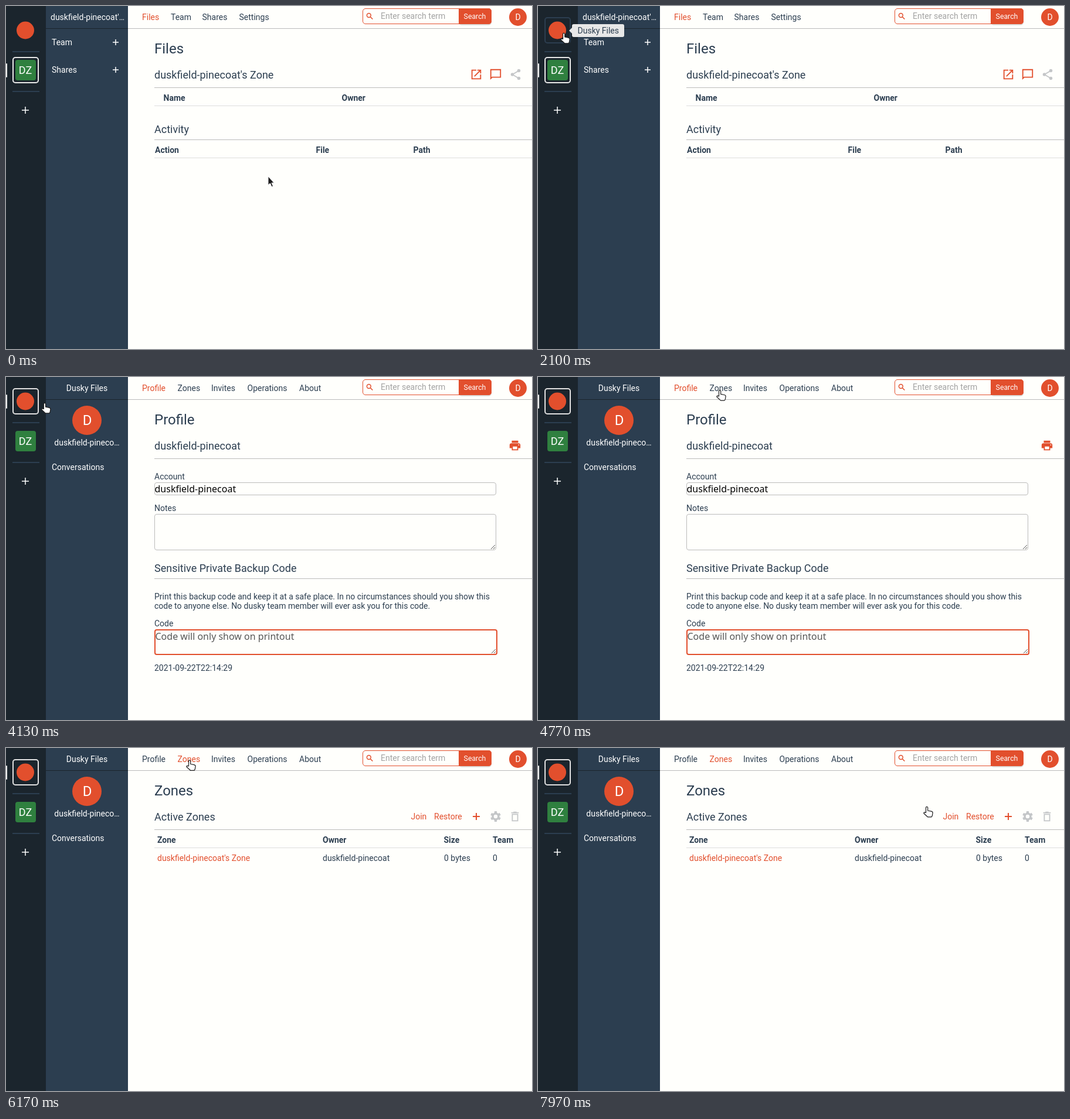
An HTML page for the animation above (8000 ms loop, 897 by 586 pixels).

```html
<!DOCTYPE html>
<html lang="en">
<head>
<meta charset="utf-8">
<title>Files and zones</title>
<style>
html, body { margin: 0; width: 100%; height: 100%; overflow: hidden; background: #fffffc; }
svg { display: block; }
text { font-family: Roboto, sans-serif; white-space: pre; }
</style>
</head>
<body>
<svg id="stage" width="897" height="586" viewBox="0 0 897 586"></svg>
<script>
const INK = '#2c3e50', RED = '#e24f2d', BAR = '#1b252d', PALE = '#fffffc';
const USER = 'duskfield-pinecoat', APP = 'Dusky Files';

const text = (x, y, s, { size = 14, fill = INK, attrs = '' } = {}) =>
  `<text x="${x}" y="${y}" font-size="${size}" fill="${fill}" ${attrs}>${s}</text>`;
const bold = (x, y, s) => text(x, y, s, { attrs: 'font-weight="700"' });
const mid = (x, y, s, size = 14) => text(x, y, s, { size, fill: '#fff', attrs: 'text-anchor="middle"' });
const rect = (x, y, w, h, fill, r = 0, attrs = '') =>
  `<rect x="${x}" y="${y}" width="${w}" height="${h}" rx="${r}" fill="${fill}" ${attrs}/>`;
const frame = (x, y, w, h, color, r = 3.5, line = 1) =>
  rect(x + line / 2, y + line / 2, w - line, h - line, 'none', r, `stroke="${color}" stroke-width="${line}"`);
const rule = (y, color = '#bbb', x = 253) => rect(x, y, 897 - x, 1, color);
const disc = (x, y, r, fill = RED) => `<circle cx="${x}" cy="${y}" r="${r}" fill="${fill}"/>`;
const plus = (x, y, r, color = '#fff', w = 1.5) =>
  `<path d="M${x - r} ${y}h${2 * r}M${x} ${y - r}v${2 * r}" stroke="${color}" stroke-width="${w}"/>`;
const group = (id, body) => `<g id="${id}">${body}</g>`;
const menu = items => items.map(([x, s, id], i) =>
  text(x, 24, s, { fill: i ? INK : RED, attrs: id ? `id="${id}"` : '' })).join('');
const grip = (x, y) => `<path d="M${x - 7} ${y}l7-7M${x - 3} ${y}l3-3" stroke="#555"/>`;

// 24-unit icon drawn at 22 px around a centre
const icon = (x, y, body, color = RED) =>
  `<g transform="translate(${x - 11} ${y - 11}) scale(.917)" fill="${color}" stroke="none">${body}</g>`;
const path = d => `<path d="${d}"/>`;
const stroke = (d, color, w) => `<path d="${d}" fill="none" stroke="${color}" stroke-width="${w}"/>`;
const GREY = '#c4c6c8';

const openIcon = icon(802, 117, stroke('M12 4H4V20H20V12M14 4H20V10M20 4L8.5 15.5', RED, 2));
const chatIcon = icon(835, 117, stroke('M3 19.5V3H21V17H5.5Z', RED, 2));
const shareIcon = icon(869, 117, stroke('M18 5L6 12L18 19', GREY, 2) +
  [[18, 5], [6, 12], [18, 19]].map(([x, y]) => disc(x, y, 3, GREY)).join(''), GREY);
const printIcon = icon(868, 117, path('M19 8H5c-1.7 0-3 1.3-3 3v6h4v4h12v-4h4v-6c0-1.7-1.3-3-3-3zm-3 11H8v-5h8v5zM18 3H6v4h12V3z') +
  disc(19, 11, 1, PALE));
const trashIcon = icon(868, 117, stroke('M7 8H17V20H7Z', GREY, 2) + path('M5 4h3.5l1-1h5l1 1H19v2H5z'), GREY);
const gearIcon = icon(835, 117, `<circle cx="12" cy="12" r="5.4" fill="none" stroke="${GREY}" stroke-width="3.8"/>` +
  [0, 60, 120].map(a => `<path d="M12 2.3v4M12 17.7v4" stroke="${GREY}" stroke-width="4.6" transform="rotate(${a} 12 12)"/>`).join(''));

const rail = rect(0, 0, 68, 586, BAR) + rect(68, 0, 140, 586, INK) + rect(68, 38, 140, 1, BAR) +
  rect(11, 77, 46, 2, INK) + rect(11, 145, 46, 2, INK) +
  disc(33, 41.5, 15) + rect(16, 92, 35, 35, '#2f803f', 4) + mid(33, 116, 'DZ', 18) + plus(33, 178, 6);

const topBar = rule(38, '#bbb', 208) +
  rect(772, 6, 56, 27, '#0002', 5) + rect(772, 4, 56, 27, RED, 5) + rect(772, 4, 6, 27, RED) +
  frame(608, 4, 220, 27, RED, 4.5) +
  `<g fill="none" stroke="${RED}" stroke-width="1.5"><circle cx="618.8" cy="16" r="3.4"/><path d="M621.3 18.5l4 4"/></g>` +
  text(639, 22, 'Enter search term', { fill: '#a3a3a3' }) + mid(799.5, 22, 'Search', 12.3) +
  disc(873, 19, 15) + mid(873, 24, 'D');

const files = rect(0, 98, 2, 24, '#eee', 1) + frame(11, 87, 45, 45, '#e8e8e8', 4, 2) +
  text(76, 24, USER + "'…", { fill: '#fff' }) +
  text(78, 67, 'Team', { fill: '#fff' }) + plus(187, 62, 5) +
  text(78, 114, 'Shares', { fill: '#fff' }) + plus(187, 109, 5) +
  menu([[232, 'Files'], [281, 'Team'], [334.5, 'Shares'], [397.5, 'Settings']]) +
  text(253, 81, 'Files', { size: 24 }) + text(253, 124, USER + "'s Zone", { size: 18 }) +
  openIcon + chatIcon + shareIcon + rule(139) + bold(268.5, 162, 'Name') + bold(572.5, 162, 'Owner') + rule(170, '#ddd') +
  text(253, 217, 'Activity', { size: 18 }) + rule(228) +
  bold(254, 251, 'Action') + bold(528.5, 251, 'File') + bold(694.5, 251, 'Path') + rule(259, '#ddd');

const hover = group('hover', frame(11, 19, 45, 45, INK, 4, 2)) +
  group('tip', rect(58, 31, 89, 22, '#e8e8e8', 3) + `<path d="M53 42l5-5v10z" fill="#e8e8e8"/>` +
    text(67.5, 47, APP));

const drive = rect(0, 30, 2, 24, '#eee', 1) + frame(11, 19, 45, 45, '#e0e0e0', 4, 2) +
  mid(138, 24, APP) + disc(138, 74, 25) + mid(138.5, 82, 'D', 24) +
  mid(138, 117, USER.slice(0, -2) + '…') + text(78, 159, 'Conversations', { fill: '#fff' }) +
  menu([[232, 'Profile', 'navProfile'], [292.5, 'Zones', 'navZones'], [350, 'Invites'], [411.5, 'Operations'], [500, 'About']]);

const field = (x, y, s, fill) => text(x, y, s, { size: 16, fill, attrs: `style="font-family:'Noto Sans',sans-serif"` });
const profile = text(253, 81, 'Profile', { size: 24 }) + text(253, 124, USER, { size: 18 }) + printIcon + rule(139) +
  text(253, 175, 'Account') + frame(253, 180, 583, 22, '#bbb') + field(253.5, 197, USER, '#000') +
  text(253, 229, 'Notes') + frame(253, 234, 583, 62, '#bbb') + grip(834, 294) +
  text(253, 333, 'Sensitive Private Backup Code', { size: 18 }) + rule(344) +
  text(253, 380, 'Print this backup code and keep it at a safe place. In no circumstances should you show this') +
  text(253, 396, 'code to anyone else. No dusky team member will ever ask you for this code.') +
  text(253, 426, 'Code') + frame(253, 431, 585, 44, RED, 3, 2) +
  field(254.5, 449, 'Code will only show on printout', '#555') + grip(835, 472) +
  text(253, 502, '2021-09-22T22:14:29');

const zones = text(253, 81, 'Zones', { size: 24 }) + text(253, 124, 'Active Zones', { size: 18 }) +
  text(690.5, 122, 'Join', { fill: RED }) + text(730, 122, 'Restore', { fill: RED }) +
  plus(802, 117, 6, RED, 2) + gearIcon + trashIcon + rule(139) +
  bold(258, 162, 'Zone') + bold(540, 162, 'Owner') + bold(746.5, 162, 'Size') + bold(830, 162, 'Team') + rule(170, '#ddd') +
  text(258, 193, USER + "'s Zone", { fill: RED }) + text(540, 193, USER) +
  text(747, 193, '0 bytes') + text(830, 193, '0');

const arrow = `<path id="arrow" d="M0 0V15l3.5-3 2.5 6 2.5-1-2.5-5.8h4.3z" fill="#1c1c1c" stroke="#fff"/>`;
const hand = `<path id="hand" d="M4.5 10.5V2a1.6 1.6 0 0 1 3.2 0V7l6 1.2q2.6.6 2.4 3l-.7 4q-.5 2.6-2 2.6H7.5L1 11.7q-.5-1.7 1.4-1.8z" fill="#fff" stroke="#1c1c1c" stroke-width="1.2" stroke-linejoin="round"/>`;

const stage = document.getElementById('stage');
stage.innerHTML = rail + topBar + group('files', files) + hover +
  group('drive', drive) + group('profile', profile) + group('zones', zones) + arrow + hand;

const el = id => document.getElementById(id);
const show = (id, on) => el(id).setAttribute('visibility', on ? 'visible' : 'hidden');
const ramp = (t, a, b) => Math.min(1, Math.max(0, (t - a) / (b - a)));

// start, end, x, y, ease-out power for x and y
const moves = [
  [800, 1570, 47, 31, 2, 1.43],
  [1600, 1760, 45, 53, 1, 1],
  [1760, 1900, 42, 46, 1, 1],
  [2100, 2100, 38, 46, 1, 1],
  [4100, 4850, 307, 22, 2, 2],
  [5670, 5670, 307, 20.5, 1, 1],
  [7410, 7970, 657, 100, 1.5, 1.5]
];

function pointer(t) {
  let x = 447, y = 291;
  for (const [a, b, tx, ty, px, py] of moves) {
    if (t < a) break;
    const left = a === b ? 0 : 1 - ramp(t, a, b);
    x += (tx - x) * (1 - left ** px);
    y += (ty - y) * (1 - left ** py);
  }
  return `translate(${x.toFixed(1)} ${y.toFixed(1)})`;
}

function draw(t) {
  const inDrive = t >= 2970, inZones = t >= 6170, isHand = t >= 2100;
  show('files', !inDrive);
  show('drive', inDrive);
  show('profile', inDrive && !inZones);
  show('zones', inZones);
  show('hover', !inDrive);
  show('tip', !inDrive);
  el('hover').setAttribute('opacity', ramp(t, 1600, 1700));
  el('tip').setAttribute('opacity', ramp(t, 1620, 1900));

  el('navProfile').setAttribute('fill', inZones ? INK : RED);
  const heat = ramp(t, 4800, 5000) * 100;
  el('navZones').style.fill = `color-mix(in srgb, ${RED} ${heat}%, ${INK})`;

  show('arrow', !isHand);
  show('hand', isHand);
  el(isHand ? 'hand' : 'arrow').setAttribute('transform', pointer(t));
}

const start = performance.now();
(function tick() {
  draw((performance.now() - start) % 8000);
  requestAnimationFrame(tick);
})();
</script>
</body>
</html>
```
